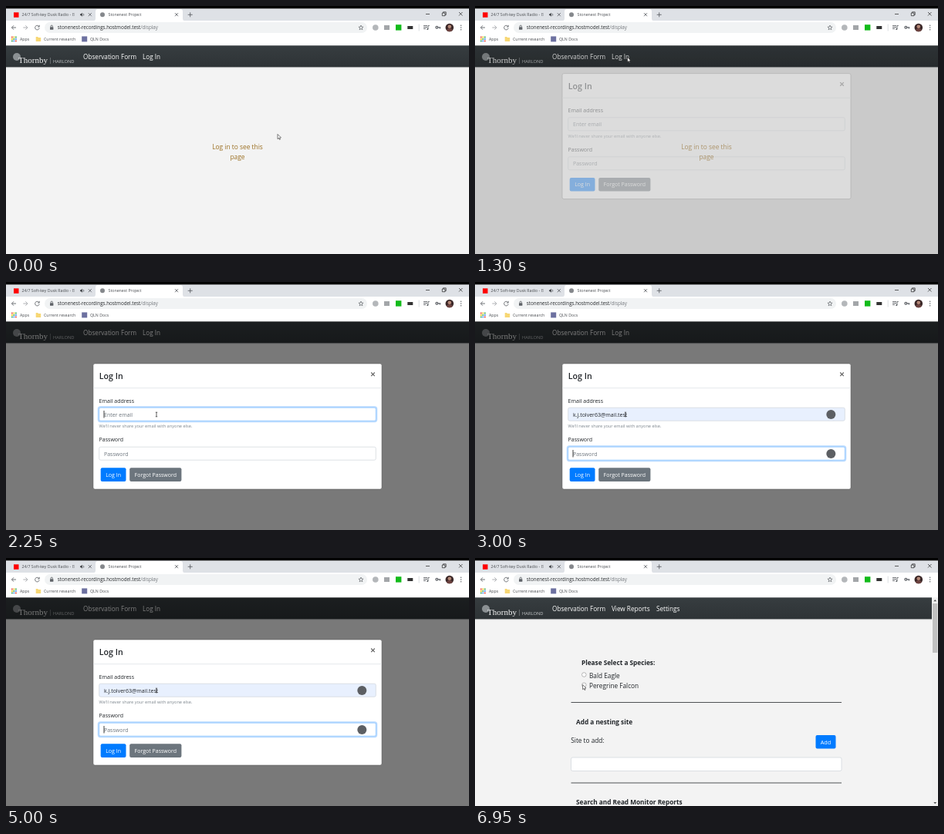
Write an HTML page that moves like this. It is 600 px wide and 322 px high and loops after 7 s.

```html
<!DOCTYPE html>
<html lang="en">
<head>
<meta charset="utf-8">
<title>Log in demo</title>
<style>
html, body { margin: 0; width: 100%; height: 100%; overflow: hidden; background: #f3f3f3; }
svg { display: block; width: 100%; height: 100%; }
text { font-family: 'Open Sans', 'Noto Sans', sans-serif; white-space: pre; }
.ui { font-size: 5.25px; fill: #4a4d51; }
.body { font-size: 8.25px; fill: #212529; }
.bold { font-weight: 700; }
.nav { font-size: 8.2px; fill: #fff; }
.form { font-size: 7px; fill: #212529; }
.mid { text-anchor: middle; }
.hint { fill: #6c757d; }
.icon { fill: none; stroke: #5f6368; stroke-width: .9; }
.field { fill: #fff; stroke: #ced4da; stroke-width: .7; }
.focus { stroke: #80bdff; }
.filled { fill: #e8f0fe; }
.ring { fill: none; stroke: #007bff; stroke-opacity: .28; stroke-width: 2; }
</style>
</head>
<body>
<svg viewBox="0 0 600 322">
  <defs>
    <linearGradient id="bar" x2="0" y2="1">
      <stop stop-color="#373d40"/><stop offset="1" stop-color="#2e3336"/>
    </linearGradient>
    <linearGradient id="fade">
      <stop offset=".5" stop-color="#dee1e6" stop-opacity="0"/><stop offset="1" stop-color="#dee1e6"/>
    </linearGradient>
  </defs>

  <!-- page -->
  <rect width="600" height="322" fill="#f3f3f3"/>
  <rect y="51" width="600" height="28.5" fill="url(#bar)"/>
  <path d="M0 79.8H600" stroke="#bfc1c2" stroke-width=".6"/>
  <circle cx="14" cy="66" r="5" fill="#8b9093"/>
  <text x="16" y="74" fill="#f4f4f4" style="font:11px 'Liberation Serif',serif">Thornby</text>
  <path d="M57.5 67V75" stroke="#8b9093" stroke-width=".6"/>
  <text x="61" y="73.8" font-size="5.8" fill="#c5c8ca">HARLOND</text>
  <text class="nav" x="100" y="69">Observation Form</text>

  <g id="guest">
    <text class="nav" id="login" x="177" y="69">Log In</text>
    <g class="mid" font-size="8.4" fill="#9c7023">
      <text x="300" y="186">Log in to see this</text>
      <text x="300" y="199">page</text>
    </g>
  </g>

  <g id="member">
    <text class="nav" x="177" y="69">View Reports</text>
    <text class="nav" x="235" y="69">Settings</text>
    <text class="body bold" x="138" y="139">Please Select a Species:</text>
    <g fill="#fff" stroke="#8a8a8a" stroke-width=".6">
      <circle cx="141.3" cy="151.5" r="2.8"/><circle cx="141.3" cy="164.8" r="2.8"/>
    </g>
    <text class="body" x="148" y="156">Bald Eagle</text>
    <text class="body" x="148" y="169">Peregrine Falcon</text>
    <path d="M124.5 187.5H475M124.5 292H475" stroke="#3c3f42" stroke-width=".9"/>
    <text class="body bold" x="131" y="216">Add a nesting site</text>
    <text class="body" x="124.3" y="239.7">Site to add:</text>
    <rect x="441.5" y="230" width="26" height="17.5" rx="2" fill="#007bff"/>
    <text class="mid" x="454.5" y="242" font-size="7.3" fill="#fff">Add</text>
    <rect class="field" x="124.5" y="259" width="350.5" height="17.5" rx="2"/>
    <text class="body bold" x="131" y="320">Search and Read Monitor Reports</text>
    <rect x="592" y="51" width="8" height="271" fill="#f1f1f1"/>
    <rect x="593" y="59" width="6.4" height="64" fill="#c1c1c1"/>
    <path d="M594.3 56.3L596.2 54L598.1 56.3ZM594.3 317L596.2 319.3L598.1 317Z" fill="#505050"/>
  </g>

  <rect id="shade" y="51" width="600" height="271"/>

  <g id="modal">
    <rect x="113" y="106" width="374" height="163" rx="2.2" fill="#fff" stroke="#555" stroke-width=".5"/>
    <text x="120.8" y="126" font-size="10.6" font-weight="600" fill="#212529">Log In</text>
    <path d="M473.2 117.5L477.8 122.1M477.8 117.5L473.2 122.1" stroke="#666" stroke-width="1.2"/>
    <path d="M113.3 137.7H486.7" stroke="#dee2e6" stroke-width=".8"/>
    <text class="form" x="120.6" y="156.5">Email address</text>
    <rect class="ring" id="emailRing" x="119.7" y="162.2" width="360.6" height="19" rx="2.6"/>
    <rect id="email" x="120.7" y="163.2" width="358.6" height="17" rx="2"/>
    <text id="emailText" x="127" y="174.7">Enter email</text>
    <text x="120.6" y="189" font-size="5.64" fill="#7b848c">We'll never share your email with anyone else.</text>
    <text class="form" x="120.6" y="207.4">Password</text>
    <rect class="ring" id="passRing" x="119.7" y="213.2" width="360.6" height="19" rx="2.6"/>
    <rect id="pass" x="120.7" y="214.2" width="358.6" height="17" rx="2"/>
    <text id="passText" x="127" y="225.7">Password</text>
    <g id="helpers" fill="#5c5f63">
      <circle cx="461.3" cy="172" r="6"/><circle cx="461.3" cy="223" r="6"/>
    </g>
    <path id="caret" stroke="#111" stroke-width=".8"/>
    <rect x="122.7" y="241.3" width="32.8" height="17.7" rx="2" fill="#007bff"/>
    <text class="form mid" x="139.1" y="252.8" style="fill:#fff">Log In</text>
    <rect x="160.2" y="241.3" width="67.2" height="17.7" rx="2" fill="#6c757d"/>
    <text class="form mid" x="193.8" y="252.8" style="fill:#fff">Forgot Password</text>
  </g>

  <!-- browser window -->
  <rect width="600" height="20" fill="#dee1e6"/>
  <rect width="600" height="3.3"/>
  <rect y="19" width="600" height="32.3" fill="#fff"/>
  <path d="M113 19.2Q116 19.2 116 16V7Q116 4 119 4H226Q229 4 229 7V16Q229 19.2 232 19.2Z" fill="#fff"/>
  <rect x="10" y="8.3" width="6.5" height="6.5" fill="#f00"/>
  <text class="ui" x="20.5" y="13.2">24/7 Soft-key Dusk Radio - B</text>
  <rect x="76" y="7" width="18" height="9" fill="url(#fade)"/>
  <path d="M96 10.3H97.3L99 8.8V13.8L97.3 12.3H96Z" fill="#4a4d51"/>
  <path class="icon" d="M100.2 9.8Q101.4 11.3 100.2 12.8" stroke-width=".6"/>
  <circle cx="125" cy="11.3" r="3" fill="#85888c"/>
  <text class="ui" x="132.5" y="13.2">Stonenest Project</text>
  <path class="icon" d="M106.8 9.2L110.8 13.2M110.8 9.2L106.8 13.2M219 9.2L223 13.2M223 9.2L219 13.2M235.7 11.3H241.7M238.7 8.3V14.3"/>
  <path d="M544 10.5H549M587 8L591.5 12.5M591.5 8L587 12.5M565.3 9H569V12.7H565.3ZM566.5 9V7.8H570.2V11.5H569" fill="none" stroke="#222" stroke-width=".7"/>

  <path class="icon" d="M13 28H7.6M10 25.3L7.4 28L10 30.7" />
  <path class="icon" d="M22.3 28H27.7M25.3 25.3L27.9 28L25.3 30.7" style="stroke:#a5a8ac"/>
  <path class="icon" d="M42.6 26.3A2.8 2.8 0 1 0 43.2 28.6M43.2 24.8V27H41"/>
  <rect x="50" y="21" width="418" height="14" rx="7" fill="#f1f3f4"/>
  <rect x="57" y="27.2" width="4.4" height="3.6" rx=".5" fill="#5f6368"/>
  <path class="icon" d="M58 27.2V26.3A1.2 1.2 0 0 1 60.4 26.3V27.2" stroke-width=".7"/>
  <text x="66.8" y="30.2" font-size="6.28" fill="#25282b">stonenest-recordings.hostmodel.test<tspan fill="#74787d">/display</tspan></text>
  <path id="star" class="icon" style="stroke-width:.7"/>
  <circle cx="478.8" cy="28" r="3.8" fill="#b4b7ba"/>
  <rect x="490" y="25" width="7" height="6" fill="#a3a6a9"/>
  <rect x="505" y="24.2" width="7.4" height="7.4" fill="#12bb1a"/>
  <rect x="520.3" y="26" width="7" height="4" fill="#333"/>
  <path d="M535.2 23.5V32.5" stroke="#ccd0d4" stroke-width=".7"/>
  <path class="icon" d="M541 25.5H546M541 27.5H546M541 29.5H544M547 30V25.5H548.8"/>
  <circle cx="546.3" cy="30" r="1.1" fill="#5f6368"/>
  <circle class="icon" cx="558.3" cy="27.8" r="1.4" style="stroke-width:1.2"/>
  <path d="M559.6 27.8H563.3M562.4 27.8V29.6" stroke="#5f6368" stroke-width="1.2"/>
  <circle cx="574.8" cy="28" r="5.3" fill="#3a2727"/>
  <path d="M571 31.7Q571.5 29 574.8 29T578.6 31.7A5.3 5.3 0 0 1 571 31.7" fill="#6d4340"/>
  <circle cx="574.8" cy="26.8" r="2.3" fill="#b58877"/>
  <g fill="#5f6368">
    <circle cx="589.6" cy="25.3" r=".75"/><circle cx="589.6" cy="28" r=".75"/><circle cx="589.6" cy="30.7" r=".75"/>
  </g>

  <g id="apps"></g>
  <text class="ui" x="18" y="45">Apps</text>
  <path d="M38.7 40H41.2L42 41H45.2V46H38.7Z" fill="#f7d774"/>
  <text class="ui" x="49" y="45">Current research</text>
  <rect x="98.2" y="39.4" width="7" height="7" fill="#6d71a0"/>
  <text class="ui" x="109" y="45">QLN Docs</text>

  <g id="pointer">
    <path id="arrow" d="M0 0V6.2L1.5 4.9L2.5 7L3.4 6.6L2.5 4.6L4.4 4.4Z" fill="#fff" stroke="#222" stroke-width=".6"/>
    <path id="beam" d="M-1.2 -2.8H1.2M-1.2 2.8H1.2M0 -2.8V2.8" stroke="#222" stroke-width=".7"/>
  </g>
</svg>
<script>
const LOOP = 7000, OPEN = 1250, FOCUS = 2200, FILL = 2700, TAB = 2850, TYPE = 5020, ENTER = 5230;
const $ = id => document.getElementById(id);
const clamp = v => Math.max(0, Math.min(1, v));
const ease = p => p * p * (3 - 2 * p);
const show = (id, on) => $(id).style.display = on ? '' : 'none';

// pointer stops: time, x, y
const stops = [[300, 352, 166.5], [1150, 197.5, 66.5], [1500, 197.5, 66.5],
  [2150, 195, 172], [5400, 195, 172], [6650, 139.6, 164.5]];

function pointerAt(t) {
  const i = stops.findIndex(s => s[0] > t);
  if (i < 1) return (i ? stops[stops.length - 1] : stops[0]).slice(1);
  const [t0, x0, y0] = stops[i - 1], [t1, x1, y1] = stops[i];
  const p = ease((t - t0) / (t1 - t0));
  return [x0 + (x1 - x0) * p, y0 + (y1 - y0) * p];
}

function setField(id, value, hint, focused, filled) {
  $(id).setAttribute('class', 'field' + (focused ? ' focus' : '') + (filled ? ' filled' : ''));
  $(id + 'Text').setAttribute('class', value ? 'form' : 'form hint');
  $(id + 'Text').textContent = value || hint;
  show(id + 'Ring', focused);
}

function draw(t) {
  const [x, y] = pointerAt(t);
  const open = t >= OPEN && t < ENTER;
  const inPass = t >= TAB, filled = t >= FILL;
  const dots = Math.floor(10 * clamp((t - TYPE) / 170));

  show('guest', t < ENTER);
  show('member', t >= ENTER);
  $('login').style.fill = t < OPEN + 40 && x < 202 && y < 72 ? '#ffa21f' : '#fff';

  const fade = open ? clamp((t - OPEN) / 150) : 0;
  $('shade').setAttribute('opacity', fade / 2);
  $('modal').setAttribute('opacity', fade);
  const drop = -25 * (1 - clamp((t - OPEN) / 300)) ** 1.65;
  $('modal').setAttribute('transform', `translate(0 ${drop})`);

  setField('email', filled ? 'k.j.tolver63@mail.test' : '', 'Enter email', t >= FOCUS && !inPass, filled);
  setField('pass', '•'.repeat(dots), 'Password', inPass, false);
  show('helpers', filled);

  const since = t - (inPass ? TAB : FOCUS);
  show('caret', since >= 0 && since % 1000 < 500 && !dots && !(filled && !inPass));
  $('caret').setAttribute('d', `M127 ${inPass ? 218 : 167}v9.5`);

  const overField = open && y > 163 && y < 181;
  show('arrow', !overField);
  show('beam', overField);
  $('pointer').setAttribute('transform', `translate(${x} ${y})`);
}

const star = Array.from({ length: 10 }, (_, i) => {
  const r = i % 2 ? 1.4 : 3.2, a = i * Math.PI / 5;
  return [460 + r * Math.sin(a), 28.2 - r * Math.cos(a)];
});
$('star').setAttribute('d', `M${star.join('L')}Z`);

const colors = ['#ea4335', '#fbbc05', '#34a853', '#4285f4'];
$('apps').innerHTML = Array.from({ length: 9 }, (_, i) =>
  `<rect x="${7 + i % 3 * 2.5}" y="${39.6 + Math.floor(i / 3) * 2.5}" width="1.7" height="1.7" fill="${colors[Math.floor(i / 3 + i % 3) % 4]}"/>`).join('');

const start = performance.now();
function tick() {
  draw((performance.now() - start) % LOOP);
  requestAnimationFrame(tick);
}
tick();
</script>
</body>
</html>
```
